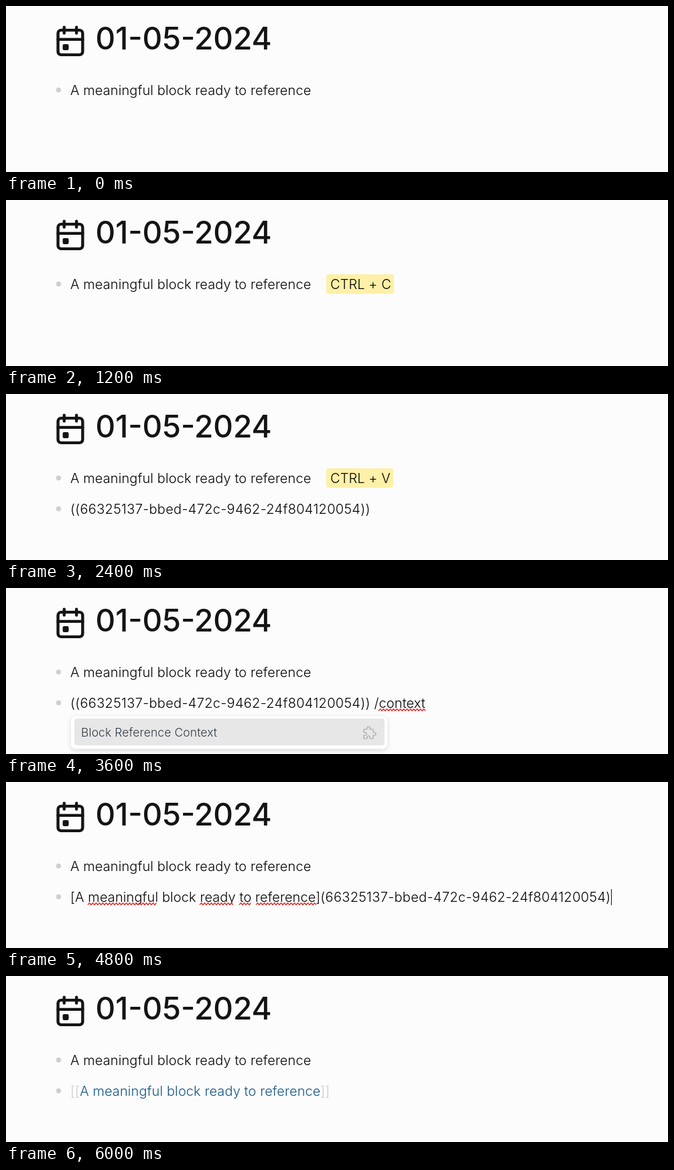
Animation, 988 px wide and 248 px high, one loop 7200 ms. Source, as an HTML page:

```html
<!DOCTYPE html>
<html lang="en">
<head>
<meta charset="utf-8">
<title>Block reference context</title>
<style>
  html, body { margin: 0; width: 100%; height: 100%; overflow: hidden; background: #fcfcfc; }
  svg { display: block; width: 988px; height: 248px; }
  text { font: 300 20px Inter, sans-serif; letter-spacing: .1px; fill: #050505; white-space: pre; }
  .title { font-size: 46px; font-weight: 500; letter-spacing: 0; fill: #141414; }
  .item { font-size: 17.5px; fill: #333b48; }
  .id { letter-spacing: .3px; }
  .link { fill: #155686; }
  .bracket { fill: #cacaca; }
  .bullet { fill: #cfcfcf; }
  .wave { fill: none; stroke: #e02c2c; stroke-width: 1.3; }
  .icon { fill: none; stroke-linecap: round; stroke-linejoin: round; }
</style>
</head>
<body>
<svg viewBox="0 0 988 248">
  <defs>
    <filter id="shadow" x="-10%" y="-30%" width="120%" height="170%">
      <feDropShadow dx="0" dy="3" stdDeviation="3" flood-color="#000" flood-opacity=".11"/>
    </filter>
  </defs>
  <rect width="988" height="248" fill="#fcfcfc"/>
  <g class="icon" stroke="#141414" stroke-width="4.4">
    <rect x="77.6" y="36.1" width="36.8" height="36.8" rx="4.6"/>
    <path d="M86.8 31.8v8.800M105.2 31.8v8.800M77.6 49.900h36.8"/>
    <rect x="86.8" y="59.1" width="4.6" height="4.6" fill="#141414"/>
  </g>
  <text class="title" x="133.5" y="65">01-05-2024</text>
  <circle class="bullet" cx="78.5" cy="125.5" r="3.7"/>
  <text x="96" y="133">A meaningful block ready to reference</text>
  <g id="keys">
    <rect id="badge" x="478" y="111" height="29" rx="4" fill="#fef0a8"/>
    <text id="combo" x="484" y="133"></text>
  </g>
  <circle class="bullet" id="bullet" cx="78.5" cy="171.5" r="3.7"/>
  <text id="line" x="96" y="179"></text>
  <path class="wave" id="wave"/>
  <path id="caret" d="M903.5 160v24" stroke="#141414"/>
  <g id="menu">
    <rect x="96.5" y="190.5" width="473" height="50" rx="8" fill="#fff" stroke="#efefef" filter="url(#shadow)"/>
    <rect x="102" y="195" width="463" height="40" rx="4" fill="#e7e7e7"/>
    <text class="item" x="112" y="222">Block Reference Context</text>
    <path class="icon" transform="translate(531 204)" stroke="#b4b4b4" stroke-width="1.6"
      d="M4 7h3a1 1 0 0 0 1-1v-1a2 2 0 0 1 4 0v1a1 1 0 0 0 1 1h3a1 1 0 0 1 1 1v3a1 1 0 0 0 1 1h1a2 2 0 0 1 0 4h-1a1 1 0 0 0-1 1v3a1 1 0 0 1-1 1h-3a1 1 0 0 1-1-1v-1a2 2 0 0 0-4 0v1a1 1 0 0 1-1 1h-3a1 1 0 0 1-1-1v-3a1 1 0 0 1 1-1h1a2 2 0 0 0 0-4h-1a1 1 0 0 1-1-1v-3a1 1 0 0 1 1-1"/>
  </g>
</svg>
<script>
const STEP = 1200;
const PHRASE = 'A meaningful block ready to reference';
const ID = '66325137-bbed-472c-9462-24f804120054';
const REF = [`((${ID}))`, 'id'];
const steps = [
  {},
  { combo: 'CTRL + C', badge: 101 },
  { combo: 'CTRL + V', badge: 100, line: [REF] },
  { line: [REF, [' /context']], waves: [[556, 627]], menu: true },
  {
    line: [[`[${PHRASE}]`], [`(${ID})`, 'id']],
    waves: [[122, 226], [289, 341], [348, 367], [373, 463]],
    caret: true
  },
  { line: [['[[', 'bracket'], [PHRASE, 'link'], [']]', 'bracket']] }
];
const $ = id => document.getElementById(id);
const show = (id, on) => $(id).setAttribute('visibility', on ? 'visible' : 'hidden');

function wavePath([from, to]) {
  let d = `M${from} 183.5`;
  for (let x = from + 2.5, up = true; x <= to; x += 2.5, up = !up) d += `L${x} ${up ? 180.7 : 183.5}`;
  return d;
}

function makeSpan([text, name = '']) {
  const span = document.createElementNS('http://www.w3.org/2000/svg', 'tspan');
  span.textContent = text;
  span.setAttribute('class', name);
  return span;
}

function render(step) {
  const { combo = '', badge = 0, line = [], waves = [], menu, caret } = steps[step];
  show('keys', combo);
  $('combo').textContent = combo;
  $('badge').setAttribute('width', badge);
  show('bullet', line.length);
  $('line').replaceChildren(...line.map(makeSpan));
  $('wave').setAttribute('d', waves.map(wavePath).join(''));
  show('menu', menu);
  show('caret', caret);
}

let current = -1;
const start = performance.now();
function tick() {
  const step = Math.floor((performance.now() - start) / STEP) % steps.length;
  if (step !== current) render(current = step);
  requestAnimationFrame(tick);
}
tick();
</script>
</body>
</html>
```
